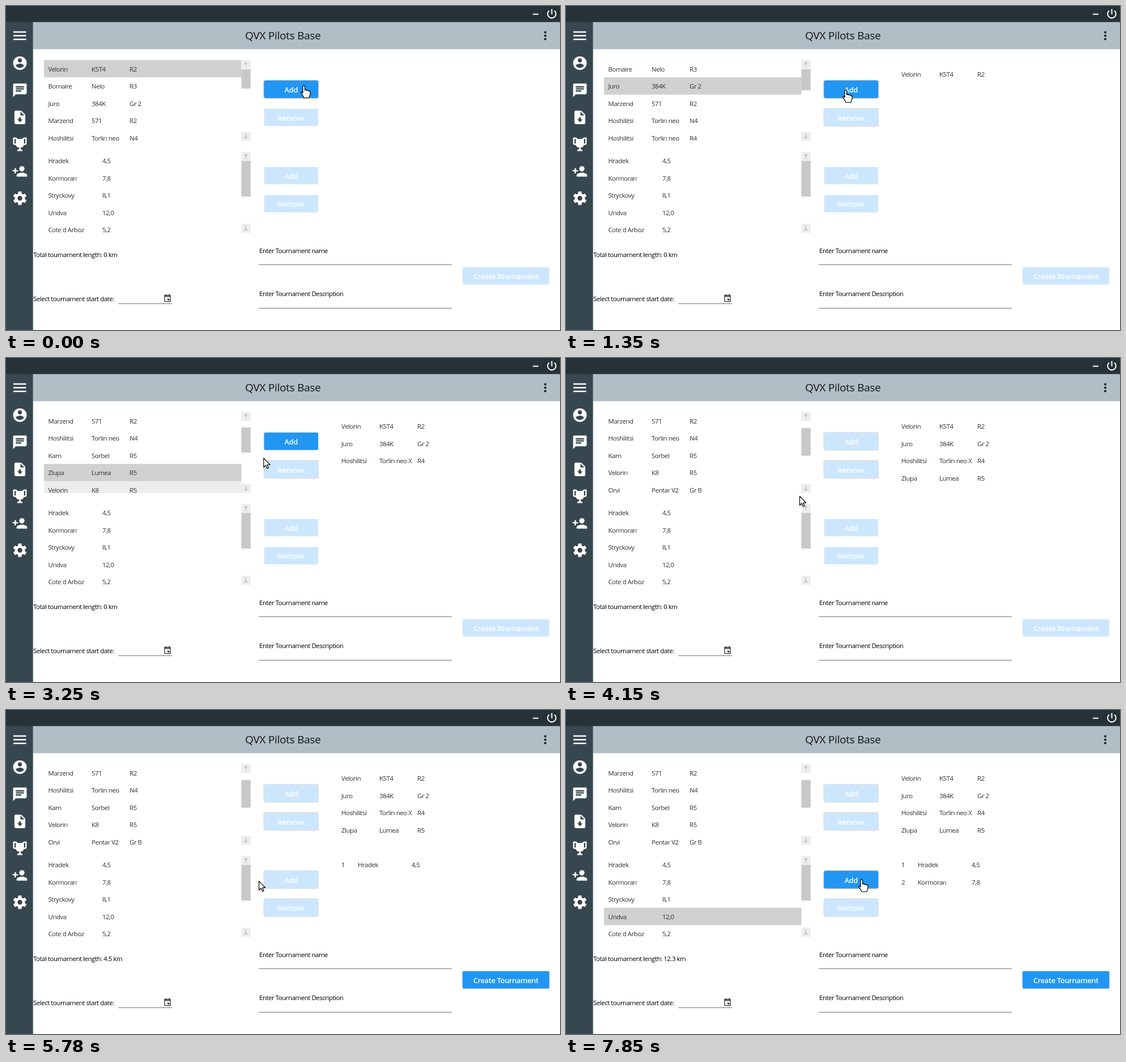
These frames come from a looping animation (978x573 px, 8 s). An HTML page:

```html
<!DOCTYPE html>
<html lang="en">
<head>
<meta charset="utf-8">
<title>Tournament setup</title>
<style>
html, body { margin: 0; width: 100%; height: 100%; overflow: hidden; background: #fff; }
svg { display: block; width: 978px; height: 573px; font: 11.5px "Open Sans", "Noto Sans", sans-serif; letter-spacing: -.042em; }
text { white-space: pre; }
.row { fill: #333; }
.btn { font-size: 12.8px; font-weight: 600; fill: #fff; text-anchor: middle; letter-spacing: -.022em; }
.title { font-size: 18.8px; text-anchor: middle; fill: #111; letter-spacing: -.01em; }
.low { filter: drop-shadow(0 .7px 1px rgba(0,0,0,.35)); }
.high { filter: drop-shadow(0 .7px 1.2px rgba(0,0,0,.8)); }
</style>
</head>
<body>
<svg viewBox="0 0 978 573">
  <defs>
    <clipPath id="carClip"><rect x="67" y="95" width="365" height="144"/></clipPath>
    <clipPath id="trackClip"><rect x="67" y="258" width="365" height="144"/></clipPath>
  </defs>
  <rect x="47.700" y="28" width="931" height="48.400" fill="#b0bec5"/>
  <rect y="28" width="47.700" height="545" fill="#37474f"/>
  <rect width="978" height="28.400" fill="#263238"/>
  <text class="title" x="489" y="59">QVX Pilots Base</text>
  <g fill="none" stroke="#fff" stroke-width="2">
    <path d="M930 14.500h10M963.500 5.500v9M959 8.200a7.300 7.300 0 1 0 9 0"/>
    <path d="M13 46h22.500m-22.500 6.500h22.500m-22.500 6.500h22.500" stroke-width="2.400"/>
  </g>
  <path d="M952 46.500v0m0 6v0m0 6v0" stroke="#111" stroke-width="4" stroke-linecap="round"/>
  <g id="icons" fill="#fff" fill-rule="evenodd"></g>
  <path d="M446 457.500h341M446 534.500h341M198 526.500h95" stroke="#707070"/>
  <path fill="#555" fill-rule="evenodd" d="M279 512a1 1 0 0 1 1-1h1v-1.500h2V511h4v-1.500h2V511h1a1 1 0 0 1 1 1v10.500a1 1 0 0 1-1 1h-10a1 1 0 0 1-1-1zM280.500 514.500v7.500h9v-7.500zM285 517.500h3.500v3.500H285z"/>
  <text x="447" y="436.500">Enter Tournament name</text>
  <text x="447" y="513">Enter Tournament Description</text>
  <text x="48" y="522">Select tournament start date:</text>
  <g id="live"></g>
</svg>
<script>
const LOOP = 8000, ROW = 30.6, STEP = 133, CARS_Y = 95.5, TRACKS_Y = 258;
const live = document.getElementById('live');

const cars = [
  'Velorin|K5T4|R2', 'Bomaire|Nelo|R3', 'Juro|384K|Gr 2', 'Marzend|571|R2',
  'Hoshilitsi|Torlin neo|N4', 'Hoshilitsi|Torlin neo X|R4', 'Karn|Sorbel|R5',
  'Zlupa|Lumea|R5', 'Velorin|K8|R5', 'Orvi|Pentar V2|Gr B'
].map(s => s.split('|'));
const tracks = [['Hradek', 4.5], ['Kormoran', 7.8], ['Stryckovy', 8.1], ['Undva', 12], ['Cote d Arboz', 5.2]];

// Pointer stops: it arrives, clicks and sets off again at once.
const stops = [
  { at: 0, click: 282, x: 526, y: 141, add: 'car' },
  { at: 814, click: 947, x: 399, y: 146, pick: 'car', item: 2 },
  { at: 1350, click: 1490, x: 494, y: 149, add: 'car' },
  { at: 2028, click: 2167, x: 402, y: 199, pick: 'car', item: 5 },
  { at: 2440, click: 2583, x: 505, y: 132, add: 'car' },
  { at: 2860, click: 2980, x: 404, y: 220, pick: 'car', item: 7 },
  { at: 3512, click: 3644, x: 506, y: 134, add: 'car' },
  { at: 4420, click: 4700, x: 396, y: 264, pick: 'track', item: 0 },
  { at: 5386, click: 5522, x: 500, y: 300, add: 'track' },
  { at: 6035, click: 6290, x: 395, y: 305, pick: 'track', item: 1 },
  { at: 6670, click: 6800, x: 491, y: 309, add: 'track' },
  { at: 7186, click: 7451, x: 400, y: 366, pick: 'track', item: 3 },
  { at: 7850, click: LOOP, x: 522, y: 300 }
];

// The screen repaints every STEP within these spans and rests between them.
const bursts = [[150, 1080], [1230, 1620], [1890, 2860], [2980, 3910],
  [4030, 4420], [4700, 5660], [5780, 6800], [6920, 7850]];

function heldTime(t) {
  const [a, b] = bursts.findLast(s => s[0] <= t) || [0, 0];
  if (!b) return 0;
  const n = Math.round((b - a) / STEP), step = (b - a) / n;
  return a + Math.min(n, Math.floor((t - a + 15) / step)) * step;
}

const ease = p => p < .5 ? 4 * p ** 3 : 1 - 4 * (1 - p) ** 3;

function pointerAt(t) {
  const i = stops.findIndex(s => t <= s.click), to = stops[i], from = stops[i - 1] || to;
  const p = t >= to.at ? 1 : ease((t - from.click) / (to.at - from.click));
  return [from.x + (to.x - from.x) * p, from.y + (to.y - from.y) * p];
}

// Replays the clicks so far for one list.
function replay(kind, t) {
  let sel = -1;
  const added = [];
  if (kind === 'car') sel = 0;
  for (const s of stops) {
    if (s.click > t + 2) break;
    if (s.pick === kind) sel = s.item;
    if (s.add === kind) { added.push(sel); sel = -1; }
  }
  return { sel, added };
}

const rect = (x, y, w, h, fill, extra = '') =>
  `<rect x="${x}" y="${y}" width="${w}" height="${h}" fill="${fill}" ${extra}/>`;
const label = (x, y, s, cls = 'row') => `<text class="${cls}" x="${x}" y="${y}">${s}</text>`;
const cells = (xs, y, words) => words.map((s, i) => label(xs[i], y, s)).join('');
const km = n => n.toFixed(1).replace('.', ',');

function button(x, y, w, text, on, shade) {
  return rect(x, y, w, ROW, on ? '#2196f3' : '#cce7fd', `rx="2" class="${shade}"`) +
    label(x + w / 2, y + 21, text, 'btn');
}

function scrollbar(top, thumbY, thumbH) {
  const arrow = (y, d) => rect(415.5, y - 8, 16.5, 16, '#ededed') +
    `<path d="M423.5 ${y + 4 * d}v${-8 * d}m-3 ${3 * d}l3 ${-3 * d}l3 ${3 * d}" fill="none" stroke="#aaa"/>`;
  return arrow(top + 8, 1) + arrow(top + 135, -1) + rect(415.5, thumbY, 16.5, thumbH, '#c8c8c8');
}

function list(top, xs, rows, sel, selFill, hover, clip) {
  const body = rows.map((words, i) => {
    const y = top + i * ROW;
    const fill = i === sel ? selFill : i === hover ? '#ededed' : '';
    return (fill ? rect(67, y, 348.5, ROW, fill) : '') + cells(xs, y + 20, words);
  }).join('');
  return `<g clip-path="url(#${clip})">${body}</g>`;
}

function hoverRow([x, y], top) {
  return x > 67 && x < 415 && y >= top && y < top + 143 ? Math.floor((y - top) / ROW) : -1;
}

function pointer(x, y, hand) {
  const shape = hand
    ? 'M-2 13V1.500a1.800 1.800 0 0 1 3.600 0V8c1-1 3-.8 3.300.6 1-.9 3-.5 3.300.8 1-.6 2.800 0 2.800 1.600V15c0 3-2 4-2.200 6.500H0c-.5-3-4-6-5-9-.5-2 1.500-2.500 3 .5z'
    : 'M0 0V16L3.700 12.600L6.200 18.300L8.600 17.200L6.200 11.600H11.200z';
  return `<path transform="translate(${x} ${y})" fill="#fff" stroke="#000" stroke-width="1.2" stroke-linejoin="round" d="${shape}"/>`;
}

function draw(t) {
  const [x, y] = pointerAt(t);
  // A row's hover tint fades a little after the pointer has left.
  const trail = pointerAt(x < 415 ? t : Math.max(0, t - 200));
  const car = replay('car', t), track = replay('track', t);
  const carOn = car.sel >= 0, trackOn = track.sel >= 0, done = track.added.length > 0;
  const n = car.added.length, scroll = t >= 2980 ? 1 : 0;
  const left = cars.filter((c, i) => !car.added.includes(i)).slice(scroll, scroll + 5);
  const total = track.added.reduce((s, i) => s + tracks[i][1], 0);
  const over = top => x > 455 && x < 552 && y >= top - 1 && y < top + 32;
  const shade = (on, top, used) => on && over(top) ? 'high' : on || used ? 'low' : '';
  const pressed = stops.some(s => s.pick === 'track' && t > s.click + 200 && t < s.click + 350);

  live.innerHTML =
    list(CARS_Y, [74.5, 151, 218], left.map(([a, b, c]) => [a, b.replace(/ X$/, ''), c]),
      left.indexOf(cars[car.sel]), '#d0d0d0', hoverRow(trail, CARS_Y), 'carClip') +
    scrollbar(CARS_Y, scroll ? 119 + n * 1.25 : 112, 34 + 3 * n + n * n / 6) +
    list(TRACKS_Y, [74.5, 170], tracks.map(r => [r[0], km(r[1])]), track.sel,
      pressed ? '#999' : '#d0d0d0', hoverRow(trail, TRACKS_Y), 'trackClip') +
    scrollbar(TRACKS_Y, 274, 63) +
    car.added.map((c, i) => cells([592, 659, 726], 125.2 + i * ROW, cars[c])).join('') +
    track.added.map((r, i) => cells([592, 621, 716], 278 + i * ROW, [i + 1, tracks[r][0], km(tracks[r][1])])).join('') +
    label(48, 444, `Total tournament length: ${total ? total.toFixed(1) : 0} km`, '') +
    button(455.7, 132, 95.3, 'Add', carOn, shade(carOn, 132, n)) +
    button(455.7, 181.6, 95.3, 'Remove', false, n ? 'low' : '') +
    button(455.7, 284.7, 95.3, 'Add', trackOn, shade(trackOn, 285, done)) +
    button(455.7, 334.3, 95.3, 'Remove', false, done ? 'low' : '') +
    button(806, 462, 153, 'Create Tournament', done, done ? 'low' : '') +
    pointer(x, y, carOn && over(132) || trackOn && over(285));
}

function drawIcons() {
  const icon = (cy, scale, d) => `<path transform="translate(24.5 ${cy}) scale(${scale}) translate(-12 -12)" d="${d}"/>`;
  const teeth = [0, 60, 120].map(a => rect(-3, -12, 6, 24, '#fff', `rx="1" transform="rotate(${a})"`)).join('');
  document.getElementById('icons').innerHTML =
    icon(101, 1.2, 'M12 2a10 10 0 1 0 0 20a10 10 0 1 0 0-20zm0 3a3 3 0 1 1 0 6a3 3 0 1 1 0-6zm0 14.200c-2.500 0-4.700-1.300-6-3.200 0-2 4-3.100 6-3.100s6 1.100 6 3.100c-1.300 1.900-3.500 3.200-6 3.200z') +
    icon(149, 1.2, 'M20 2H4a2 2 0 0 0-2 2v18l4-4h14a2 2 0 0 0 2-2V4a2 2 0 0 0-2-2zM6 6h12v2H6zm0 3h12v2H6zm0 3h8v2H6z') +
    icon(197, 1.2, 'M14 2H6a2 2 0 0 0-2 2v16a2 2 0 0 0 2 2h12a2 2 0 0 0 2-2V8zM12 19l-4-4h2.500v-3h3v3H16zM13 9V3.500L18.500 9z') +
    icon(244.5, 1.2, 'M18 2c-.9 0-2 1-2 2H8c0-1-1.100-2-2-2H2v9c0 1 1 2 2 2h2.200c.4 2 1.700 3.700 4.800 4v2.100C8 19.500 8 22 8 22h8s0-2.500-3-2.900V17c3.100-.3 4.400-2 4.800-4H20c1 0 2-1 2-2V2zM6 11H4V4h2zm14 0h-2V4h2z') +
    icon(292.5, 1.17, 'M15 4a4 4 0 1 0 0 8a4 4 0 1 0 0-8zM6 10V7H4v3H1v2h3v3h2v-3h3v-2zm9 4c-2.700 0-8 1.300-8 4v2h16v-2c0-2.700-5.300-4-8-4z') +
    `<g transform="translate(24.5 340)">${teeth}<circle r="9"/><circle r="4.2" fill="#37474f"/></g>`;
}

let shown = -1;
function tick() {
  const t = heldTime(performance.now() % LOOP);
  if (t !== shown) draw(shown = t);
  requestAnimationFrame(tick);
}
drawIcons();
tick();
</script>
</body>
</html>
```
